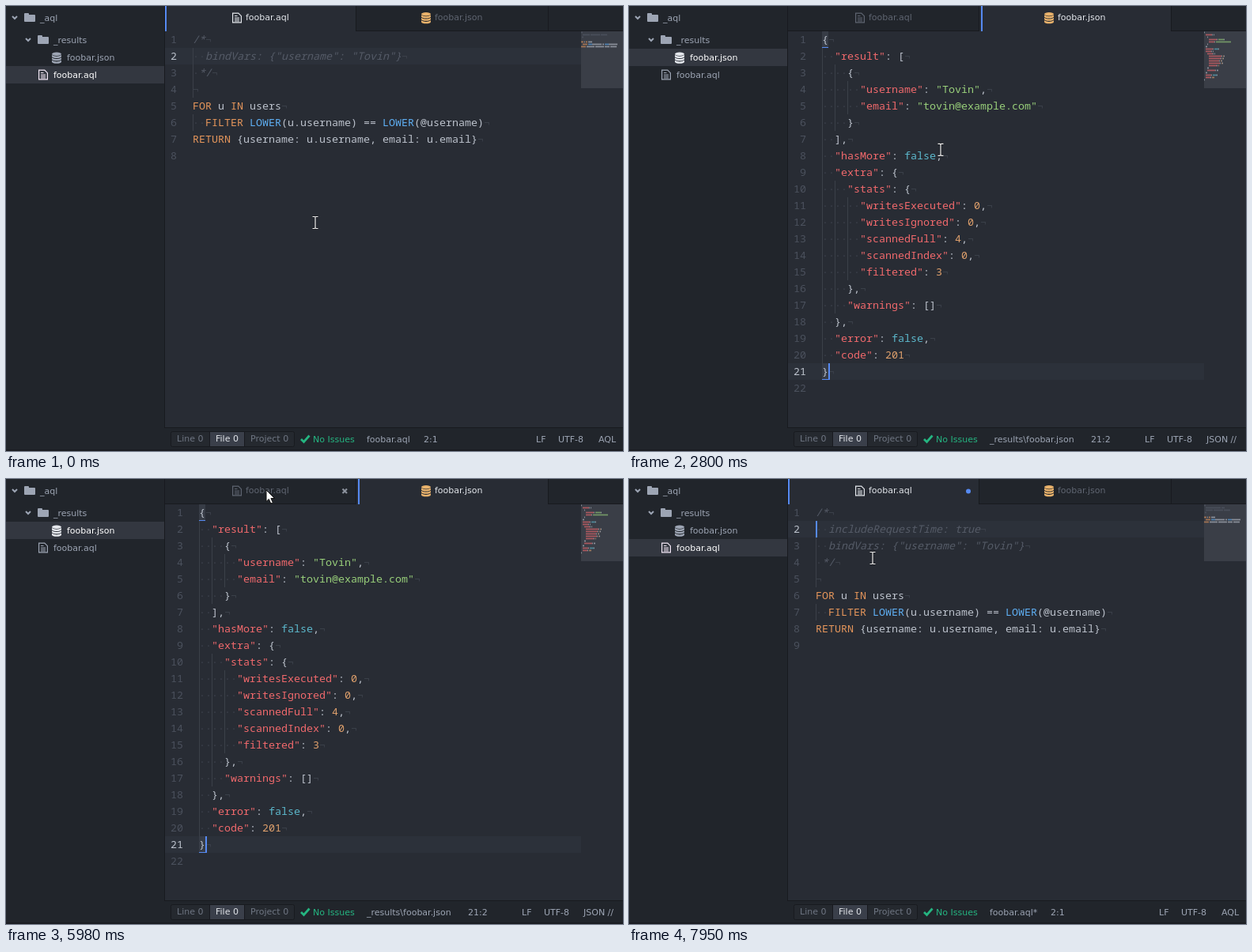
An HTML page that plays this animation: 780 by 563 pixels, repeating every 8000 ms.

```html
<!DOCTYPE html>
<html lang="en">
<head>
<meta charset="utf-8">
<title>Query editor</title>
<style>
html, body { margin: 0; width: 100%; height: 100%; overflow: hidden; background: #282c34; }
svg { display: block; width: 780px; height: 563px; }
text { white-space: pre; }
.ui { font: 11px "DejaVu Sans", sans-serif; }
.code { font: 13.333px "Noto Sans Mono", monospace; }
.com { font-style: italic; }
</style>
</head>
<body>
<svg id="stage" viewBox="0 0 780 563" xmlns="http://www.w3.org/2000/svg"></svg>
<script>
(() => {
const stage = document.getElementById('stage');
const C = {
  text: '#bcc2cc', com: '#555b67', kw: '#e5965b', fn: '#5fb0f5', key: '#f0696c',
  str: '#98cf7a', lit: '#5cb8cc', num: '#dfa06c', inv: '#3d424c', line: '#4b515d',
  panel: '#21252b', edge: '#181a1f', ui: '#9da5b4', dim: '#5f6571', bright: '#e4e7ec',
  blue: '#568af2', db: '#eab36c'
};

function el(tag, attrs, parent = stage) {
  const node = document.createElementNS('http://www.w3.org/2000/svg', tag);
  for (const k in attrs) node.setAttribute(k, attrs[k]);
  parent.appendChild(node);
  return node;
}
const group = (parent = stage, attrs = {}) => el('g', attrs, parent);
const rect = (x, y, width, height, fill, parent, extra) =>
  el('rect', { x, y, width, height, fill, ...extra }, parent);
function label(x, y, str, fill, parent, cls = 'ui') {
  const node = el('text', { x, y, fill, class: cls }, parent);
  node.textContent = str;
  return node;
}
const set = (node, attrs) => { for (const k in attrs) node.setAttribute(k, attrs[k]); };
const show = (node, on) => node.setAttribute('display', on ? 'inline' : 'none');
const at = (x, y) => ({ transform: `translate(${x} ${y})` });

// icons
function folder(x, y) {
  el('path', { d: 'M0 1.5q0-1 1-1h4q1 0 1 1v1h7q1 0 1 1v7q0 1-1 1H1q-1 0-1-1z', fill: C.ui, ...at(x, y) });
}
function chevron(x, y) {
  el('path', { d: 'M1 1l3 3 3-3', fill: 'none', stroke: C.ui, 'stroke-width': 2, ...at(x, y) });
}
function fileIcon(x, y) {
  return el('path', {
    d: 'M.6.6h7.2l3.6 3.6v8.2H.6zM3 4h3.5M3 6.5h6M3 8.5h6M3 10.5h6',
    fill: 'none', stroke: C.ui, 'stroke-width': 1.2, ...at(x, y)
  });
}
function dbIcon(x, y, fill) {
  const g = group(stage, { fill, ...at(x, y) });
  el('ellipse', { cx: 6, cy: 2.3, rx: 6, ry: 2.2 }, g);
  for (const dy of [0, 3.4, 6.8])
    el('path', { d: `M0 ${3.5 + dy}q6 3.4 12 0v1.9q-1 2-6 2t-6-2z` }, g);
  return g;
}

// syntax colouring
const rules = {
  aql: [/(FOR|IN|FILTER|RETURN)\b/y, 'kw', /LOWER/y, 'fn'],
  json: [/"[^"]*"(?=:)/y, 'key', /"[^"]*"/y, 'str', /true|false/y, 'lit', /\d+/y, 'num'],
  plain: []
};
function tokens(line, syntax) {
  const out = [], set = rules[syntax];
  for (let i = 0; i < line.length;) {
    if (line[i] === ' ') { i++; continue; }
    let word = line[i], kind = 'text';
    for (let r = 0; r < set.length; r += 2) {
      set[r].lastIndex = i;
      const m = set[r].exec(line);
      if (m) { word = m[0]; kind = set[r + 1]; break; }
    }
    const last = out[out.length - 1];
    if (last && kind === 'text' && last.kind === kind && last.col + last.word.length === i) last.word += word;
    else out.push({ col: i, word, kind });
    i += word.length;
  }
  return out;
}

const rowY = n => 32 + 21 * (n - 1);

function codeView(lines, syntax, commentEnd = 0) {
  const g = group(), x0 = lines.length > 9 ? 244 : 236;
  const nums = [];
  lines.forEach((line, i) => {
    const n = i + 1, y = rowY(n) + 15, indent = line.search(/\S|$/);
    const comment = n <= commentEnd;
    const num = label(x0 - 20, y, n, C.line, g, 'code');
    num.setAttribute('text-anchor', 'end');
    nums.push(num);
    const inBlock = n > 1 && n <= commentEnd + 1;
    const guides = inBlock && commentEnd ? 1 : Math.floor(indent / 2);
    for (let k = 0; k < guides; k++) rect(x0 + 16 * k, rowY(n), 1, 21, '#3b4049', g);
    for (let k = 0; k < indent; k++) label(x0 + 8 * k, y, '·', C.inv, g, 'code');
    if (n < lines.length) label(x0 + 8 * line.length, y, '¬', C.inv, g, 'code');
    const parts = comment
      ? [{ col: indent, word: line.trim(), kind: 'com' }]
      : tokens(line, syntax);
    for (const p of parts) {
      label(x0 + 8 * p.col, y, p.word, C[p.kind], g, comment ? 'code com' : 'code');
      for (const m of p.word.matchAll(/\S+/g))
        rect(727 + p.col + m.index, 32.6 + 3 * i, m[0].length, 1.7, C[p.kind], g, { opacity: .62 });
    }
  });
  return { g, nums, x0 };
}

// layout
rect(0, 0, 780, 563, '#282c34');
rect(0, 0, 200, 563, C.panel);
const treeRow = rect(0, 76, 200, 22, '#333740');
rect(200, 0, 1, 534, C.edge);
chevron(7, 12); folder(23, 8.5); label(43, 19, '_aql', C.ui);
chevron(24, 40); folder(40, 36.5); label(60, 47, '_results', C.ui);
const treeDb = dbIcon(58, 58.5, C.ui), treeJson = label(77, 69, 'foobar.json', C.ui);
const treeFile = fileIcon(41, 80.5), treeAql = label(60, 91, 'foobar.aql', C.ui);

function inactive(x, w) {
  const cover = group();
  rect(x, 0, w, 32, C.panel, cover);
  rect(x, 31, w, 1, C.edge, cover);
  return cover;
}
inactive(686, 94);
const cover1 = inactive(201, 242), cover2 = inactive(443, 242);
rect(442, 0, 1, 32, C.edge);
rect(685, 0, 1, 32, C.edge);
const mark1 = rect(201, 0, 2, 32, C.blue), mark2 = rect(445, 0, 2, 32, C.blue);
const tabFile = fileIcon(286, 8.5), tabAql = label(303, 18, 'foobar.aql', C.ui);
dbIcon(525, 8, C.db);
const tabJson = label(542, 18, 'foobar.json', C.ui);
const closeX = el('path', { d: 'M425.5 12.5l5.5 5.5m0-5.5l-5.5 5.5', 'stroke-width': 2.2 });
const dot = el('circle', { cx: 429, cy: 15.5, r: 3, fill: C.blue });

// editor
const rowHi = rect(201, 0, 526, 21, '#2c313a');
rect(727, 32, 53, 72, '#3a3e47');
const query = [
  '/*', '  bindVars: {"username": "Tovin"}', ' */', '', 'FOR u IN users',
  '  FILTER LOWER(u.username) == LOWER(@username)',
  'RETURN {username: u.username, email: u.email}', ''
];
const timed = [query[0], '  includeRequestTime: true', ...query.slice(1)];
const result = `{
  "result": [
    {
      "username": "Tovin",
      "email": "tovin@example.com"
    }
  ],
  "hasMore": false,
  "extra": {
    "stats": {
      "writesExecuted": 0,
      "writesIgnored": 0,
      "scannedFull": 4,
      "scannedIndex": 0,
      "filtered": 3
    },
    "warnings": []
  },
  "error": false,
  "code": 201
}
`.split('\n');
const brackets = group();
for (const n of [1, 21]) {
  rect(244, rowY(n), 8, 21, '#373c46', brackets);
  rect(244, rowY(n) + 20, 8, 1, C.blue, brackets);
}
const views = {
  query: codeView(query, 'aql', 3),
  timed: codeView(timed, 'aql', 4),
  wait: codeView(['Executing query...'], 'plain'),
  result: codeView(result, 'json')
};
const caret = rect(0, 0, 2, 21, C.blue);

// status bar
rect(200, 533, 580, 1, C.edge);
rect(200, 534, 580, 29, C.panel);
rect(0, 561, 780, 2, '#1b1d22');
rect(208.5, 538.5, 156, 19, '#25292f', stage, { stroke: C.edge, rx: 2 });
rect(258, 539, 43, 18, '#3a3f4a');
rect(257, 539, 1, 18, C.edge);
rect(301, 539, 1, 18, C.edge);
label(216, 551, 'Line 0', '#6f7683');
label(265, 551, 'File 0', '#e2e5ea');
label(309, 551, 'Project 0', '#6f7683');
el('path', { d: 'M373 548l3.5 3.5 7-8', fill: 'none', stroke: '#25b581', 'stroke-width': 2.8 });
label(388, 552, 'No Issues', '#25b581');
const fileName = label(456, 552, '', C.ui), pos = label(528, 552, '', C.ui);
const ending = label(670, 552, 'LF', C.ui), encoding = label(698, 552, 'UTF-8', C.ui);
const grammar = label(749, 552, '', C.ui);

// mouse
const beam = group();
const beamD = 'M-3.5-7.5h2.5l1 .8 1-.8h2.5M-3.5 7.5h2.5l1-.8 1 .8h2.5M0-7v14';
el('path', { d: beamD, fill: 'none', stroke: '#14161a', 'stroke-width': 2.6, opacity: .7 }, beam);
el('path', { d: beamD, fill: 'none', stroke: '#f2f2f2', 'stroke-width': 1.2 }, beam);
const arrow = el('path', {
  d: 'M0 0v14.5l3.3-3.1 2.5 5.6 2.6-1.1-2.5-5.4h4.6z',
  fill: '#fff', stroke: '#111', 'stroke-width': 1
});

// time, x, y
const route = [
  [2200, 391, 274], [2800, 394, 182], [3190, 383, 115], [3720, 383, 115], [3900, 376, 72],
  [4160, 365, 146], [4790, 335, 469], [4980, 360, 498], [5350, 570, 300], [5680, 420, 70],
  [5860, 329, 14], [6200, 329, 14], [6970, 308, 100]
];
function mouse(t) {
  const i = route.findIndex(p => p[0] > t);
  if (i === 0) return route[0].slice(1);
  if (i < 0) return route[route.length - 1].slice(1);
  const [a, b] = [route[i - 1], route[i]], k = (t - a[0]) / (b[0] - a[0]);
  return [a[1] + (b[1] - a[1]) * k, a[2] + (b[2] - a[2]) * k];
}

const blinks = [1130, 1970, 2400, 2920, 3330, 3770, 4160, 4570, 4960, 5380, 5790, 6130, 6430, 6830, 7240];
const OPEN = 1530, DONE = 1840, BACK = 6130, UNDO = 7650, DIRTY = 7950;
const ramp = (t, from, len) => Math.min(1, Math.max(0, (t - from) / len));

// view name, caret row and column
function editorState(t) {
  if (t < 1130) return ['query', 2, 1];
  if (t < OPEN) return ['query', 8, 1];
  if (t < DONE) return ['wait', 1, 19];
  if (t < BACK) return ['result', 21, 2];
  if (t < UNDO) return ['query', 8, 1];
  return ['timed', 2, 1];
}

function draw(t) {
  const [name, row, col] = editorState(t);
  const json = t >= OPEN && t < BACK, dirty = t >= DIRTY;

  for (const v in views) show(views[v].g, v === name);
  const view = views[name];
  view.nums.forEach((n, i) => n.setAttribute('fill', i + 1 === row ? C.text : C.line));
  show(brackets, name === 'result');
  rowHi.setAttribute('y', rowY(row));
  set(caret, { x: view.x0 + 8 * (col - 1), y: rowY(row) });
  show(caret, blinks.filter(b => b <= t).length % 2);

  treeRow.setAttribute('y', json ? 54 : 76);
  treeDb.setAttribute('fill', json ? C.bright : C.ui);
  treeJson.setAttribute('fill', json ? '#fff' : C.ui);
  treeFile.setAttribute('stroke', json ? C.ui : '#f3e8f6');
  treeAql.setAttribute('fill', json ? C.ui : '#fff');

  show(cover1, json);
  show(cover2, !json);
  const k = ramp(t, OPEN, 350) - ramp(t, BACK, 350);
  mark1.setAttribute('opacity', 1 - k);
  mark2.setAttribute('opacity', k);
  tabFile.setAttribute('stroke', json ? C.dim : C.bright);
  tabAql.setAttribute('fill', json ? C.dim : C.bright);
  tabJson.setAttribute('fill', json ? C.bright : C.dim);

  fileName.textContent = json ? '_results\\foobar.json' : dirty ? 'foobar.aql*' : 'foobar.aql';
  pos.textContent = row + ':' + col;
  pos.setAttribute('x', json ? 584 : dirty ? 533 : 528);
  ending.setAttribute('x', json ? 652 : 670);
  encoding.setAttribute('x', json ? 680 : 698);
  grammar.setAttribute('x', json ? 730 : 749);
  grammar.textContent = json ? 'JSON //' : 'AQL';

  const [x, y] = mouse(t), onTabs = y < 32;
  show(beam, !onTabs);
  show(arrow, onTabs);
  set(onTabs ? arrow : beam, at(x, y));
  show(closeX, onTabs && x < 443);
  closeX.setAttribute('stroke', json ? '#8b919c' : C.bright);
  show(dot, dirty);
}

const start = performance.now();
function tick() {
  draw((performance.now() - start) % 8000);
  requestAnimationFrame(tick);
}
tick();
})();
</script>
</body>
</html>
```
